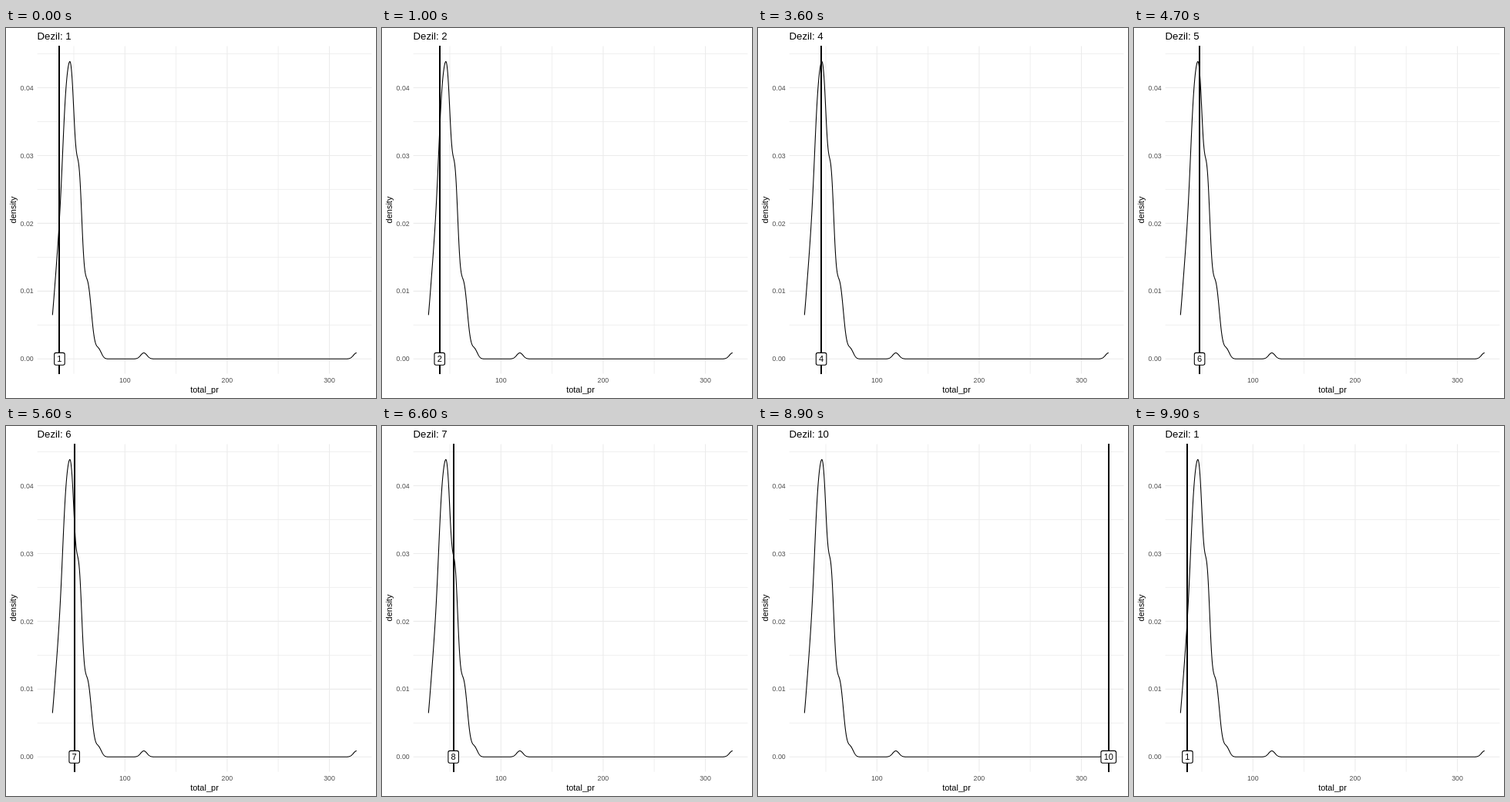
Animation of 480x480 px, one loop 10000 ms. Source, as an HTML page:

```html
<!DOCTYPE html>
<html lang="de">
<head>
<meta charset="utf-8">
<title>Dezile</title>
<style>
  html, body { margin: 0; height: 100%; overflow: hidden; background: #fff; }
  svg { display: block; width: 480px; height: 480px; font: 11px "Liberation Sans", Arial, sans-serif; }
  .tick { font-size: 8.8px; fill: #4d4d4d; }
  .mid { text-anchor: middle; }
  .end { text-anchor: end; }
  path { fill: none; stroke: #000; stroke-width: 1.07; }
  #minor, #major { stroke: #ebebeb; }
  #minor { stroke-width: .8; }
  #line { stroke-width: 2; shape-rendering: crispEdges; }
</style>
</head>
<body>
<svg viewBox="0 0 480 480">
  <path id="minor"/>
  <path id="major"/>
  <g id="ticks" class="tick"></g>
  <path id="curve" stroke-linejoin="round"/>
  <text id="title" x="40.6" y="15" font-size="13.2"></text>
  <text class="mid" x="257.5" y="473">total_pr</text>
  <text class="mid" transform="translate(13.3 236) rotate(-90)">density</text>
  <g id="marker">
    <path id="line" d="M0 23.4V448.6"/>
    <rect id="box" y="421.4" height="15.8" rx="2.1" fill="#fff" stroke="#000" stroke-width="1.07"/>
    <text id="label" class="mid" y="433.3"></text>
  </g>
</svg>
<script>
const el = id => document.getElementById(id);
const LEFT = 40.6, RIGHT = 474.5, TOP = 23.6, BOTTOM = 448.6, BASE = 429.3;
const px = value => 154.3 + (value - 100) * 1.326;
const py = density => BASE - density * 8795;

// Grid and axis labels
const grid = { major: '', minor: '' };
let ticks = '';
for (let v = 50; v <= 300; v += 50) {
  const major = v % 100 === 0;
  grid[major ? 'major' : 'minor'] += `M${px(v)} ${TOP}V${BOTTOM}`;
  if (major) ticks += `<text class="mid" x="${px(v)}" y="459.7">${v}</text>`;
}
for (let i = 0; i <= 9; i++) {
  const major = i % 2 === 0, density = i * 0.005, y = py(density);
  grid[major ? 'major' : 'minor'] += `M${LEFT} ${y}H${RIGHT}`;
  if (major) ticks += `<text class="end" x="35.7" y="${y + 3.1}">${density.toFixed(2)}</text>`;
}
el('minor').setAttribute('d', grid.minor);
el('major').setAttribute('d', grid.major);
el('ticks').innerHTML = ticks;

// Density as a sum of Gaussians: [centre, height, sigma] in pixels
const bumps = [
  [68.5, 125, 6.5], [78.2, 261, 5.08], [86, 260, 4.4], [95, 202, 4],
  [105.8, 96, 5.2], [120, 12, 3.8], [178.8, 7.8, 4.1], [454.8, 7.8, 4.1]
];
const height = x => bumps.reduce(
  (sum, [centre, peak, sigma]) => sum + peak * Math.exp(-(((x - centre) / sigma) ** 2) / 2), 0);
const points = [];
for (let x = 60.3; x <= 454.8; x += 0.5) points.push(`${x} ${BASE - height(x)}`);
el('curve').setAttribute('d', 'M' + points.join('L'));

// Marker: each decile is held, then moves linearly to the next
const deciles = [36, 40, 42, 45, 46.6, 49, 52, 55, 61, 326.6].map(px);
const arrival = k => Math.round(9.9 * (k + 1));

function draw(now) {
  const tick = Math.floor(now / 100) % 100;
  let from = 0;
  while (arrival(from) < tick) from++;
  const to = (from + 1) % 10;
  const steps = from === 0 ? 7 : 6;
  const p = Math.max(0, (tick - arrival(from) + steps) / steps);
  const x = deciles[from] + (deciles[to] - deciles[from]) * p;
  const label = String((p >= 0.5 ? to : from) + 1);
  const width = 7.4 + 6.12 * label.length;

  el('title').textContent = `Dezil: ${(p > 0.5 ? to : from) + 1}`;
  el('label').textContent = label;
  el('box').setAttribute('x', -width / 2);
  el('box').setAttribute('width', width);
  el('marker').setAttribute('transform', `translate(${x} 0)`);
}

const begin = performance.now();
(function loop() {
  draw(performance.now() - begin);
  requestAnimationFrame(loop);
})();
</script>
</body>
</html>
```
